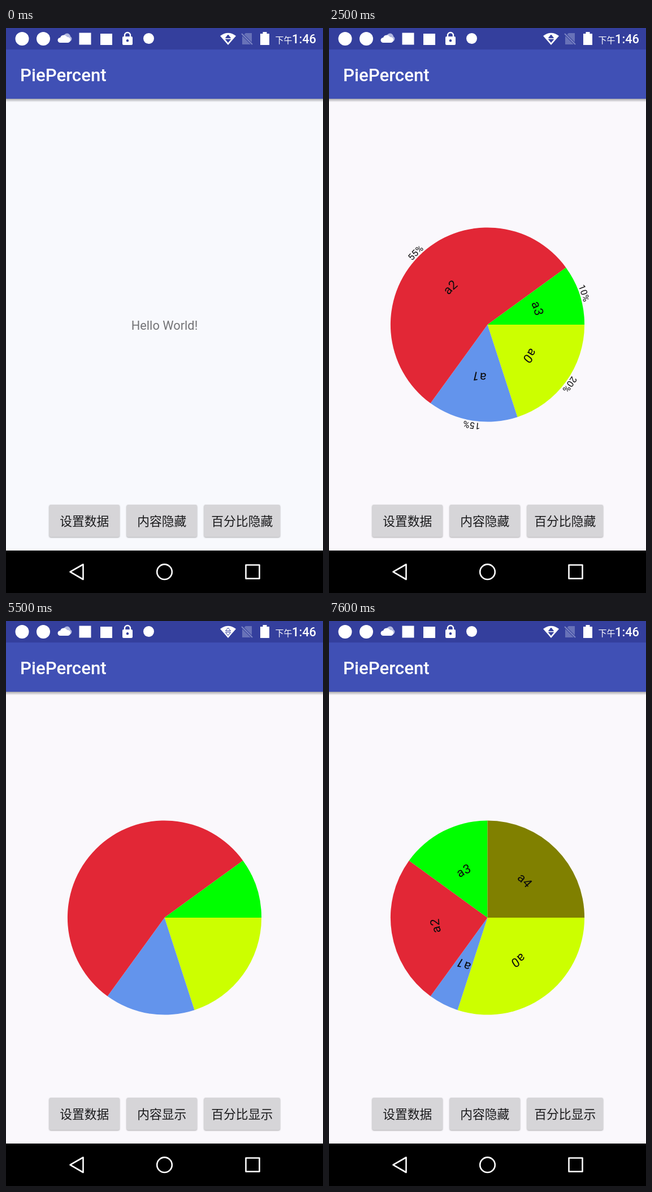
An HTML page for the animation above (8000 ms loop, 561 px wide and 998 px high).

```html
<!DOCTYPE html>
<html lang="zh-CN">
<head>
<meta charset="utf-8">
<title>PiePercent</title>
<style>
  html, body { margin: 0; width: 100%; height: 100%; overflow: hidden; background: #000; }
  svg { display: block; width: 100vw; height: 100vh; font-family: Roboto, "Noto Sans CJK SC", "Noto Sans CJK", sans-serif; }
  .button rect { fill: #d6d5d8; }
  .button text { font-size: 21.8px; text-anchor: middle; fill: #1a1a1c; }
  .label { font-size: 22px; }
  .percent { font-size: 16px; }
  .pie text { text-anchor: middle; fill: #0c0c0c; }
</style>
</head>
<body>
<svg viewBox="0 0 561 998">
  <defs>
    <linearGradient id="shade" x2="0" y2="1">
      <stop stop-color="#000" stop-opacity=".32"/>
      <stop offset="1" stop-color="#000" stop-opacity="0"/>
    </linearGradient>
  </defs>
  <rect id="page" width="561" height="923"/>
  <rect y="125" width="561" height="6" fill="url(#shade)"/>
  <rect y="37" width="561" height="88" fill="#4050b5"/>
  <rect width="561" height="38" fill="#343f9d"/>
  <text x="25" y="94" font-size="31.2" font-weight="500" fill="#fff">PiePercent</text>

  <g fill="#fff">
    <circle cx="28.5" cy="19" r="12"/>
    <circle cx="66" cy="19" r="12"/>
    <path d="M102 16a6 6 0 0 1 12-1a5 5 0 0 1-1 9h-8z" fill="#b3b9e0"/>
    <path d="M96 26a4.500 4.500 0 0 1 0-9a6.500 6.500 0 0 1 12-1a5 5 0 0 1 2 10z"/>
    <rect x="129.500" y="8.500" width="21" height="21"/>
    <rect x="167" y="10" width="21" height="20"/>
    <path d="M210 16v-3a5 5 0 0 1 10 0v3" fill="none" stroke="#fff" stroke-width="2.400"/>
    <path fill-rule="evenodd" d="M208 15h14q2 0 2 2v11q0 2-2 2h-14q-2 0-2-2v-11q0-2 2-2zM215 20a2.300 2.300 0 1 0 .01 0z"/>
    <circle cx="252.500" cy="18.500" r="9.500"/>
    <path d="M379 14Q393 3.500 407 14L393 30z"/>
    <path id="arrows" d="M388.500 17.500L393 12L397.500 17.500zM388.500 20L393 25.500L397.500 20z" stroke="#343f9d"/>
    <path d="M424 9h11v20h-17v-14z" fill="#6872b8"/>
    <path d="M417 10L436 29" stroke="#343f9d" stroke-width="4"/>
    <path d="M417 10L436 29" stroke="#7e87c4" stroke-width="2"/>
    <path d="M454.500 7h7v3h4.500v20h-16v-20h4.500z"/>
    <text x="476.500" y="26.500" font-size="15">下午</text>
    <text x="506" y="27" font-size="21.8" font-weight="500">1:46</text>
  </g>

  <text id="hello" x="280.500" y="532.500" font-size="21.8" text-anchor="middle" fill="#737376">Hello World!</text>
  <g id="pies"></g>
  <g id="buttons"></g>

  <rect y="923" width="561" height="75"/>
  <g fill="none" stroke="#fff" stroke-width="2.600" stroke-linejoin="round">
    <path d="M136.500 947.500V974L113.500 960.700z"/>
    <circle cx="280.500" cy="960.700" r="13.300"/>
    <rect x="424.500" y="948.500" width="24" height="24"/>
  </g>
</svg>
<script>
const LOOP = 8000, STEP = 100, CX = 280.5, CY = 524, RADIUS = 171.6;
const COLORS = ['#cf0', '#6394ec', '#e22736', '#0f0', '#808000'];
const $ = id => document.getElementById(id);

const DATA_AT = [1000, 6000];
const DATA = [[20, 15, 55, 10], [30, 5, 25, 15, 25]];
const LABELS_HIDDEN = [3000, 7100], PERCENT_HIDDEN_FROM = 4400;
const ARROWS = [[0, 'both'], [500, 'none'], [2500, 'both'], [2900, 'outline'], [4400, 'both'], [5500, 'outline'], [7100, 'both']];
const PRESSES = [
  { button: 0, start: 1000, peak: 1100 },
  { button: 1, start: 2900, peak: 3100 },
  { button: 2, start: 4400, peak: 4500 },
  { button: 0, start: 6000, peak: 6000 },
  { button: 1, start: 7100, peak: 7200 },
];

function arc(radius, from, to) {
  const point = share => {
    const a = share / 50 * Math.PI;
    return `${CX + radius * Math.cos(a)} ${CY + radius * Math.sin(a)}`;
  };
  return `M${point(from)}A${radius} ${radius} 0 ${to - from > 50 ? 1 : 0} 1 ${point(to)}`;
}

function curvedText(cls, id, path, text) {
  return `<path id="${id}" d="${path}" fill="none"/><text class="${cls}">
    <textPath href="#${id}" startOffset="50%">${text}</textPath></text>`;
}

function pieMarkup(shares, n) {
  let sum = 0, slices = '', texts = '';
  shares.forEach((share, i) => {
    const from = sum, to = sum += share;
    slices += `<path d="${arc(RADIUS, from, to)}L${CX} ${CY}z" fill="${COLORS[i]}"/>`;
    texts += curvedText('label', `label${n}${i}`, arc(RADIUS / 2, from, to), 'a' + i)
      + curvedText('percent', `percent${n}${i}`, arc(174.5, from, to), share + '%');
  });
  return `<g class="pie">${slices}${texts}</g>`;
}

$('pies').innerHTML = DATA.map(pieMarkup).join('');
$('buttons').innerHTML = [[76.5, 124.5], [213.5, 124.5], [350.5, 134.5]].map(([x, w]) =>
  `<g class="button"><rect x="${x}" y="842" width="${w}" height="57" rx="3"/>
   <text x="${x + w / 2}" y="878.5"></text></g>`).join('');

const pies = [...document.querySelectorAll('.pie')];
const buttons = [...document.querySelectorAll('.button')];
const show = (el, on) => { el.style.display = on ? '' : 'none'; };

function liftOf(button, t) {
  const lifts = PRESSES.filter(p => p.button === button && t >= p.start).map(p =>
    t < p.peak ? (t - p.start) / (p.peak - p.start) : 1 - (t - p.peak) / 400);
  return Math.max(0, ...lifts);
}

function draw(t) {
  const labels = t < LABELS_HIDDEN[0] || t >= LABELS_HIDDEN[1];
  const percent = t < PERCENT_HIDDEN_FROM;
  const current = DATA_AT.filter(at => t >= at).length - 1;

  $('page').setAttribute('fill', t < 500 ? '#f8f9fd' : '#faf8fc');
  show($('hello'), current < 0);
  pies.forEach((pie, i) => show(pie, i === current));
  document.querySelectorAll('.label').forEach(el => show(el, labels));
  document.querySelectorAll('.percent').forEach(el => show(el, percent));

  const arrows = ARROWS.filter(([at]) => t >= at).pop()[1];
  show($('arrows'), arrows !== 'none');
  $('arrows').setAttribute('fill', arrows === 'both' ? '#343f9d' : 'none');

  const action = visible => visible ? '隐藏' : '显示';
  const captions = ['设置数据', '内容' + action(labels), '百分比' + action(percent)];
  buttons.forEach((button, i) => {
    const lift = liftOf(i, t);
    button.firstElementChild.style.filter =
      `drop-shadow(0 ${1.5 + 2.5 * lift}px ${1.3 + 1.7 * lift}px rgba(0,0,0,.32))`;
    button.lastElementChild.textContent = captions[i];
  });
}

let last = -1;
function tick() {
  const t = Math.floor(performance.now() % LOOP / STEP) * STEP;
  if (t !== last) draw(last = t);
  requestAnimationFrame(tick);
}
tick();
</script>
</body>
</html>
```
